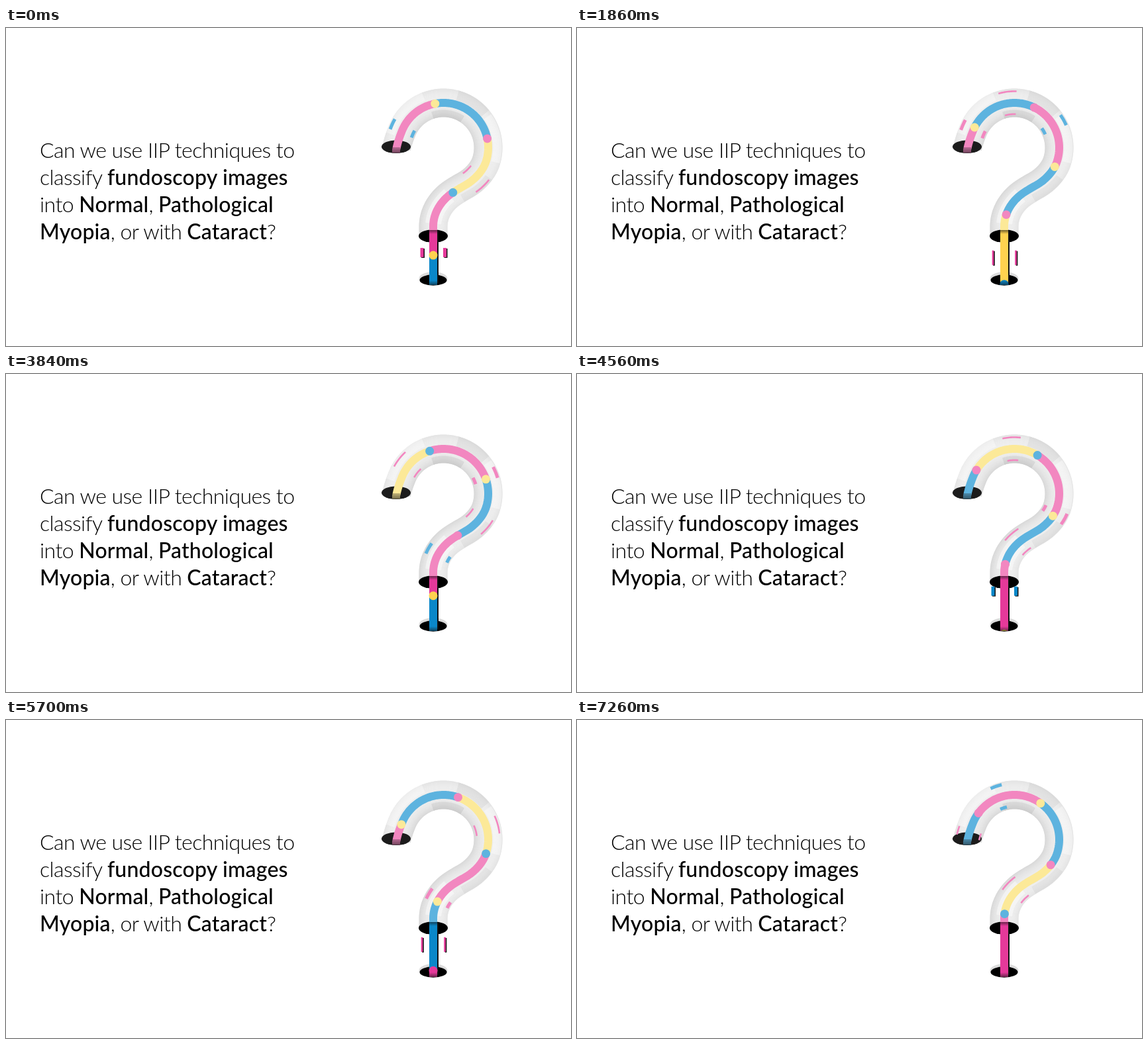
These frames come from a looping animation (853 by 480 pixels, 7.32 s). An HTML page with a canvas:

```html
<!DOCTYPE html>
<html lang="en">
<head>
<meta charset="utf-8">
<title>Classifying fundoscopy images</title>
<style>
  html, body { margin: 0; width: 100%; height: 100%; overflow: hidden; background: #fff; }
  canvas, svg { position: absolute; left: 0; top: 0; }
  text { font: 300 32px Lato, "Open Sans", sans-serif; letter-spacing: -.55px; fill: #000; }
  .b { font-weight: 500; letter-spacing: .2px; }
</style>
</head>
<body>
<canvas id="stage" width="853" height="480"></canvas>
<svg width="853" height="480">
  <text x="51" y="196">Can we use IIP techniques to</text>
  <text x="51" y="237">classify <tspan class="b">fundoscopy images</tspan></text>
  <text x="51" y="278">into <tspan class="b">Normal</tspan>, <tspan class="b">Pathological</tspan></text>
  <text x="51" y="319"><tspan class="b">Myopia</tspan>, or with <tspan class="b">Cataract</tspan>?</text>
</svg>
<script>
const canvas = document.getElementById('stage');
const screen2d = canvas.getContext('2d');
const backdrop = document.createElement('canvas');
backdrop.width = 853;
backdrop.height = 480;
let ctx = backdrop.getContext('2d');

// Centre line of the question mark, from the upper opening to the lower one.
const track = document.createElementNS('http://www.w3.org/2000/svg', 'path');
track.setAttribute('d', 'M589 190V184Q591.5 171 597.2 157' +
  'A67.5 67.5 0 0 1 660.5 113A67.5 67.5 0 0 1 728 180.5A67.5 67.5 0 0 1 724 203.5' +
  'C718 219 705 230 697 235C688 240.5 679 245 671 251' +
  'C661 258.5 645 275 645 300V395');
const LEAD = 6;                          // path length before distance 0
const LENGTH = track.getTotalLength();
const distAtY = y => LENGTH - LEAD - (395 - y);   // on the vertical part
const pointAt = len => track.getPointAtLength(Math.max(0, Math.min(LENGTH, len)));
const samples = Array.from({ length: Math.floor(LENGTH) + 1 }, (_, i) => {
  const p = pointAt(i), a = pointAt(i - 1), b = pointAt(i + 1);
  const d = Math.hypot(b.x - a.x, b.y - a.y);
  return { x: p.x, y: p.y, nx: (b.y - a.y) / d, ny: (a.x - b.x) / d };
});

const START = -LEAD, END = samples.length - 1.01 - LEAD;
const TUBE_START = 4, TUBE_END = distAtY(314);

function at(s, off = 0) {
  const f = s + LEAD, i = Math.floor(f), k = f - i;
  const a = samples[i], b = samples[i + 1];
  const mix = key => a[key] + (b[key] - a[key]) * k;
  return [mix('x') + off * mix('nx'), mix('y') + off * mix('ny')];
}

function line(s0, s1, off, width, color, lo = START, hi = END) {
  s0 = Math.max(s0, lo);
  s1 = Math.min(s1, hi);
  if (s1 <= s0) return;
  const n = Math.ceil((s1 - s0) / 1.5);
  ctx.beginPath();
  for (let i = 0; i <= n; i++) ctx.lineTo(...at(s0 + (s1 - s0) * i / n, off));
  ctx.lineWidth = width;
  ctx.strokeStyle = color;
  ctx.stroke();
}

function ellipse(x, y, rx, ry, color) {
  ctx.beginPath();
  ctx.ellipse(x, y, rx, ry, 0, 0, 7);
  ctx.fillStyle = color;
  ctx.fill();
}

function fade(x, y0, y1, a0, a1) {
  const g = ctx.createLinearGradient(0, y0, 0, y1);
  g.addColorStop(0, `rgba(20,20,20,${a0})`);
  g.addColorStop(1, `rgba(20,20,20,${a1})`);
  ctx.fillStyle = g;
  ctx.fillRect(x - 6, y0, 12, y1 - y0);
}

function clipped(rects, draw) {
  ctx.save();
  ctx.beginPath();
  rects.forEach(r => ctx.rect(...r));
  ctx.clip();
  draw();
  ctx.restore();
}

function paintBackdrop() {
  ctx.fillStyle = '#fff';
  ctx.fillRect(0, 0, 853, 480);
  line(TUBE_START, TUBE_END, 0, 43, '#e9e9e9');
  for (let o = -20.5; o <= 20.5; o++) {
    const v = o < 0 ? 238 - 22 * (o / 21) ** 2 : 238 - 10 * (o / 21) ** 4;
    line(TUBE_START, TUBE_END, o, 2, `rgb(${v},${v},${v})`);
  }
  // Soft facets on the tube
  line(128, 170, 14, 15, 'rgba(90,90,90,.07)');
  line(88, 150, -16, 11, 'rgba(90,90,90,.1)');
  line(255, 300, 15, 12, 'rgba(90,90,90,.06)');
  line(20, 85, 15, 13, 'rgba(255,255,255,.35)');
  line(175, 235, 14, 13, 'rgba(255,255,255,.35)');
  line(315, 365, 0, 24, 'rgba(255,255,255,.4)');

  ellipse(589, 179.3, 22, 9.8, '#1c1c1c');
  ellipse(645, 314, 22, 9.8, '#000');
  ellipse(645, 378, 21.5, 10, '#dcdcdc');
  ellipse(645, 380.5, 20.5, 8.3, '#000');
  ctx.fillStyle = '#111';
  ctx.fillRect(650, 306, 3, 79);
}

const SOFT = { pink: '#f287c0', blue: '#5db3df', yellow: '#fce998' };
const VIVID = { pink: '#e5399a', blue: '#0a87c9', yellow: '#ffd24f' };

const STEP = 105.2, PERIOD = 5 * STEP, FIRST = -7.7;
const bands = ['pink', 'blue', 'yellow', 'pink', 'blue'];
const balls = ['pink', 'yellow', 'pink', 'blue', 'yellow'];
// centre, length, width, colour of each pair of side marks
const marks = [
  [33, 14, 5, 'blue'], [268, 22, 2.6, 'pink'],
  [409, 14, 5, 'pink'], [479, 22, 2.6, 'pink']
];

function stripe(shift, palette) {
  const from = Math.floor((START - shift - FIRST) / STEP) - 1;
  const each = draw => {
    for (let i = from; i < from + 8; i++) {
      draw(FIRST + i * STEP + shift, ((i % 5) + 5) % 5);
    }
  };
  each((s, k) => line(s, s + STEP + .5, 0, 12, palette[bands[k]]));
  each((s, k) => {
    if (s > START && s < END) ellipse(...at(s), 6.5, 6.5, palette[balls[k]]);
  });
}

function sideMarks(shift) {
  const drop = distAtY(314), floor = distAtY(380);
  for (const [p, len, width, color] of marks) {
    for (let s = (p + shift) % PERIOD - PERIOD; s < END + len; s += PERIOD) {
      const a = s - len / 2, b = s + len / 2;
      for (const off of [17.5, -17]) {
        line(a, b, off, width, SOFT[color], TUBE_START + 3, distAtY(306));
        if (b < drop) continue;
        ctx.save();
        ctx.translate(1.5, 1);
        line(a, b, off, width, '#111', drop, floor);
        ctx.restore();
        line(a, b, off, width, VIVID[color], drop, floor);
      }
    }
  }
}

paintBackdrop();
ctx = screen2d;

function draw(now) {
  const shift = Math.floor((now % 7320) / 60) * 4.8;
  ctx.drawImage(backdrop, 0, 0);
  clipped([[0, 0, 620, 188.5], [620, 0, 233, 305]], () => stripe(shift, SOFT));
  clipped([[0, 305, 853, 83]], () => stripe(shift, VIVID));
  fade(589, 180, 189, .25, .6);
  fade(645, 305, 311, .6, 0);
  fade(645, 381, 388, 0, .6);
  sideMarks(shift);
}

const began = performance.now();
function tick() {
  draw(performance.now() - began);
  requestAnimationFrame(tick);
}
tick();
</script>
</body>
</html>
```
